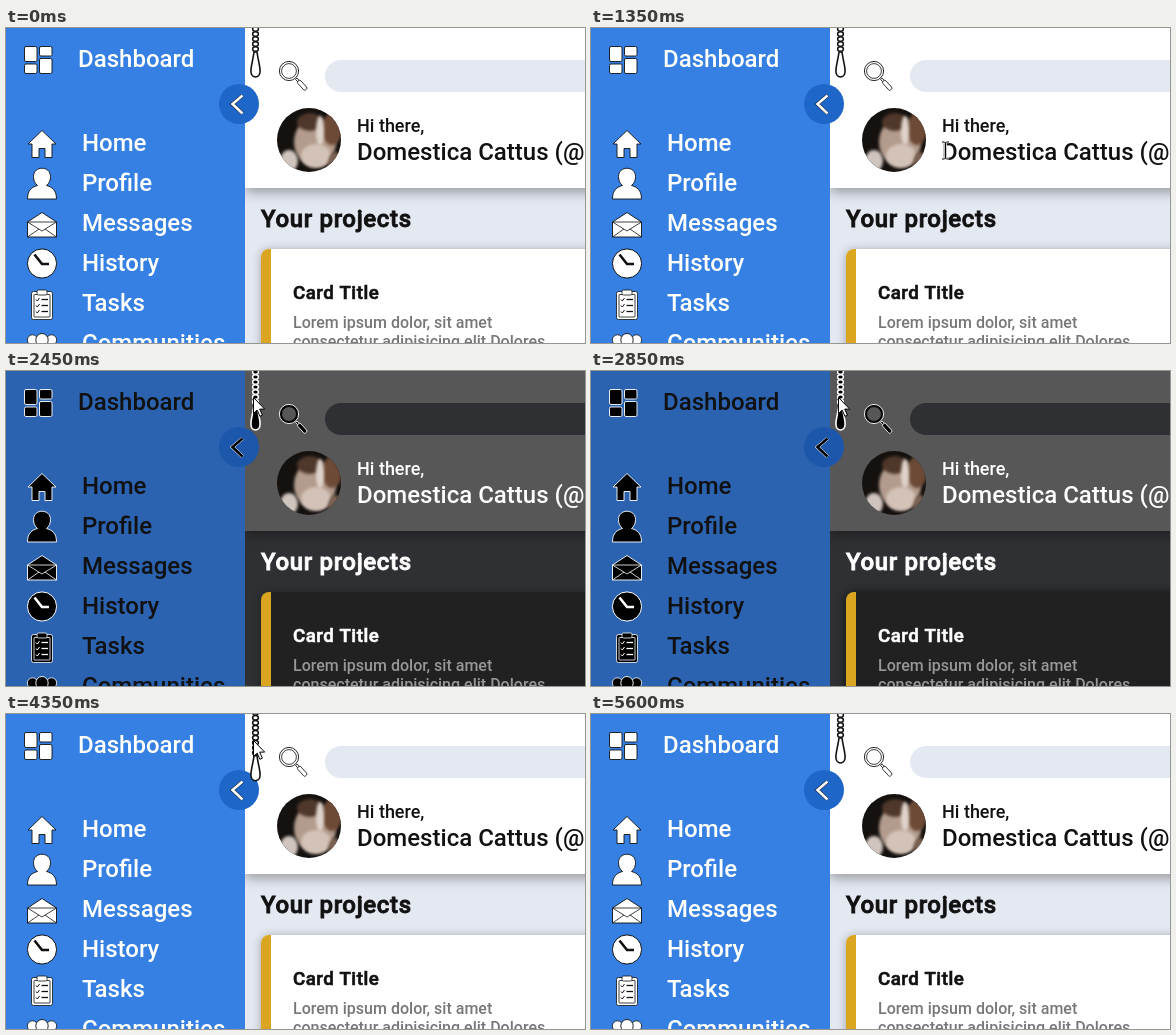
An HTML page with a canvas for the animation above (6200 ms loop, 579 by 315 pixels).

```html
<!DOCTYPE html>
<html lang="en">
<head>
<meta charset="utf-8">
<title>Dashboard theme switch</title>
<style>
  html, body { margin: 0; width: 100%; height: 100%; overflow: hidden; background: #e4e8f1; }
  canvas { display: block; width: 579px; height: 315px; }
</style>
</head>
<body>
<canvas id="stage" width="579" height="315"></canvas>
<script>
const ctx = document.getElementById('stage').getContext('2d');
const LOOP = 6200, STEP = 50;
const DARK_AT = 2450, LIGHT_AT = 3950;
const FONT = 'Roboto, sans-serif';

const LIGHT = {
  side: '#3580e2', sideText: '#fff', knob: '#1e66c8', fill: '#fff', line: '#111',
  head: '#fff', page: '#e4e8f1', text: '#111', card: '#fff', soft: '#777'
};
const DARK = {
  side: '#2b63b0', sideText: '#111', knob: '#1c57ac', fill: '#000', line: '#fff',
  head: '#575757', page: '#2f3033', text: '#fff', card: '#212121', soft: '#979797'
};

// Pointer path: time, x, y
const ENTER = [
  [900, 573, 195], [1100, 468, 158], [1350, 354, 122], [1500, 303, 91],
  [1600, 281, 66], [1750, 262, 43], [1900, 250, 30], [2000, 247, 26]
];
const LEAVE = [
  [4650, 247, 26], [4800, 263, 40], [4950, 295, 64], [5100, 338, 82],
  [5300, 412, 100], [5550, 540, 105]
];

const clamp = v => Math.max(0, Math.min(1, v));
const ease = v => { v = clamp(v); return v * v * (3 - 2 * v); };
const ramp = (t, from, to) => ease((t - from) / (to - from));

function along(path, t) {
  let i = 1;
  while (i < path.length - 1 && path[i][0] < t) i++;
  const [a, b] = [path[i - 1], path[i]];
  const k = clamp((t - a[0]) / (b[0] - a[0]));
  return [Math.round(a[1] + (b[1] - a[1]) * k), Math.round(a[2] + (b[2] - a[2]) * k)];
}

function paint(path, fill, stroke, width = 1) {
  if (fill) { ctx.fillStyle = fill; ctx.fill(path); }
  if (stroke) { ctx.strokeStyle = stroke; ctx.lineWidth = width; ctx.stroke(path); }
}

function shape(d, fill, stroke, width) { paint(new Path2D(d), fill, stroke, width); }

function disc(x, y, rx, ry, fill, stroke, width) {
  const p = new Path2D();
  p.ellipse(x, y, rx, ry, 0, 0, 7);
  paint(p, fill, stroke, width);
}

function box(x, y, w, h, r, fill, stroke, width) {
  const p = new Path2D();
  p.roundRect(x, y, w, h, r);
  paint(p, fill, stroke, width);
}

function withShadow(alpha, blur, dy, draw) {
  ctx.save();
  ctx.shadowColor = `rgba(0,0,0,${alpha})`;
  ctx.shadowBlur = blur;
  ctx.shadowOffsetY = dy;
  draw();
  ctx.restore();
}

function text(str, x, y, size, color) {
  ctx.font = `500 ${size}px ${FONT}`;
  ctx.fillStyle = color;
  ctx.fillText(str, x, y);
}

// Medium weight thickened by its outline
function heavyText(str, x, y, size, color) {
  ctx.save();
  ctx.letterSpacing = size * 0.027 + 'px';
  text(str, x, y, size, color);
  ctx.strokeStyle = color;
  ctx.lineWidth = size * 0.034;
  ctx.strokeText(str, x, y);
  ctx.restore();
}

function drawPage(c, shade) {
  ctx.fillStyle = c.page;
  ctx.fillRect(0, 0, 579, 315);
  withShadow(0.35, 12, 4, () => box(239, -20, 380, 180, 0, c.head));
  withShadow(shade, 10, 1, () => box(255, 221, 380, 160, 8, c.card));
  box(255, 221, 10, 160, [8, 0, 0, 0], '#daa520');

  box(319, 32, 300, 32, 16, c.page);
  drawSearch(c);
  drawAvatar();

  text('Hi there,', 351, 104, 18, c.text);
  text('Domestica Cattus (@', 351, 132, 24, c.text);
  heavyText('Your projects', 255, 199, 24, c.text);
  heavyText('Card Title', 287, 271, 18.72, c.text);
  text('Lorem ipsum dolor, sit amet', 287, 300, 16, c.soft);
  text('consectetur adipisicing elit Dolores', 287, 319, 16, c.soft);
}

function drawSearch(c) {
  ctx.save();
  ctx.translate(291, 51.5);
  ctx.rotate(Math.PI / 4 + 0.05);
  box(-1, -1, 4, 2, 0, c.fill, c.line, 0.8);
  box(2, -2, 11.5, 4, 1.5, c.fill, c.line, 0.8);
  ctx.restore();
  disc(283, 43, 9.6, 9.6, c.fill, c.line, 0.9);
  disc(283, 43, 7.4, 7.4, c.head, c === LIGHT ? c.line : c.fill, 0.8);
}

function drawAvatar() {
  ctx.save();
  const round = new Path2D();
  round.arc(303, 112, 32, 0, 7);
  ctx.clip(round);
  box(271, 80, 64, 64, 0, '#15110f');
  ctx.filter = 'blur(1.5px)';
  disc(309, 114, 21, 24, '#b39c8d');
  disc(304, 94, 13, 9, '#4f382b');
  disc(326, 101, 10, 16, '#6d4a36');
  disc(314, 103, 4, 15, '#ded3cb');
  disc(310, 128, 15, 12, '#d3c2b7');
  disc(283, 133, 9, 11, '#d0c5be');
  disc(329, 136, 7, 12, '#7b6252');
  ctx.restore();
}

function drawSidebar(c) {
  ctx.fillStyle = c.side;
  ctx.fillRect(0, 0, 239, 315);
  disc(233, 76, 20, 20, c.knob);
  const chevron = 'M236.5 67.5L226.5 76L236.5 85.5';
  shape(chevron, null, c.line, 3.6);
  shape(chevron, null, c.fill, 2.6);

  text('Dashboard', 72, 39, 24, c.sideText);
  ['Home', 'Profile', 'Messages', 'History', 'Tasks', 'Communities']
    .forEach((name, i) => text(name, 76, 123 + i * 40, 24, c.sideText));
  drawIcons(c);
}

function drawIcons(c) {
  const { fill, line } = c;
  const icon = (d, w = 0.9) => shape(d, fill, line, w);

  box(18.5, 18.5, 12.5, 15, 1.5, fill, line, 0.9);
  box(33.5, 18.5, 12.5, 9.5, 1.5, fill, line, 0.9);
  box(18.5, 36, 12.5, 9.5, 1.5, fill, line, 0.9);
  box(33.5, 30.5, 12.5, 15, 1.5, fill, line, 0.9);

  icon('M36 102.5L50 116H46V129.5H39V120.5H33V129.5H26V116H22Z');

  icon('M21.5 171C21.5 162 26 159 31.5 157.5C28.5 155 27.5 152 27.5 148.5' +
       'C27.5 137.5 44.5 137.5 44.5 148.5C44.5 152 43.5 155 40.5 157.5' +
       'C46 159 50.5 162 50.5 171Z');

  icon('M21.5 194L36 184.5L50.5 194V209H21.5Z');
  shape('M21.5 194L36 203L50.5 194M21.5 209L33 201M50.5 209L39 201M21.5 194H50.5', null, line, 0.8);

  disc(36, 235.5, 14.6, 14.6, fill, line, 1);
  shape('M28.5 226.5L36 236H43', null, line, 2.6);

  box(25.5, 263.5, 21, 28, 2, fill, line, 0.8);
  box(28, 266.5, 16, 22.5, 0.5, fill, line, 0.8);
  box(31, 262, 10, 5, 1.5, fill, line, 0.8);
  for (let y = 271.5; y < 288; y += 6) {
    shape(`M30 ${y}l1.3 1.5l2.2 -3`, null, line, 1);
    shape(`M35.5 ${y}h6.5`, null, line, 1.3);
  }

  for (const x of [26.5, 45.5]) {
    disc(x, 312, 5.2, 5.2, fill, line, 0.8);
  }
  disc(36, 312, 6.2, 6.5, fill, line, 0.9);
}

function drawCord(c, drop) {
  ctx.save();
  ctx.translate(0, drop);
  for (let y = 21; y > -60; y -= 5) disc(249.5, y, 2.9, 2.3, c.fill, c.line, 1.5);
  shape('M248 24C247 32 244.9 38 244.9 43C244.9 51 254.1 51 254.1 43' +
        'C254.1 38 252 32 251 24Z', c.fill, c.line, 1.6);
  ctx.restore();
}

function drawPointer(x, y) {
  const onText = x >= 351 && ((y >= 89 && y <= 108 && x <= 419) || (y >= 111 && y <= 138));
  ctx.save();
  ctx.translate(x + 0.5, y + 0.5);
  if (onText) {
    const beam = 'M-3.5 -8.5H-1L0 -7.5L1 -8.5H3.5M0 -7.5V7.5M-3.5 8.5H-1L0 7.5L1 8.5H3.5';
    shape(beam, null, '#fff', 2.4);
    shape(beam, null, '#000', 1);
  } else {
    shape('M0 0V16L3.7 12.6L6.4 18.8L8.9 17.7L6.2 11.6H11.2Z', '#fff', '#000', 1);
  }
  ctx.restore();
}

// Quick tug on the cord, held briefly, then released
const tug = (t, start, hold) => 30 * (ramp(t, start, start + 150) - ramp(t, start + hold, start + hold + 150));

function render(t) {
  const theme = t >= DARK_AT && t < LIGHT_AT ? DARK : LIGHT;
  const gloom = ramp(t, DARK_AT, DARK_AT + 150) - ramp(t, LIGHT_AT, LIGHT_AT + 200);
  const hover = 10 * (ramp(t, 1800, 2050) - ramp(t, 4860, 5260));
  const drop = hover + tug(t, DARK_AT, 250) + tug(t, LIGHT_AT, 300);

  drawPage(theme, 0.3 + 0.4 * gloom);
  drawSidebar(theme);
  drawCord(theme, drop);
  if (t >= 900 && t < 5600) drawPointer(...along(t < 4650 ? ENTER : LEAVE, t));
}

const begin = performance.now();
function tick() {
  const t = (performance.now() - begin) % LOOP;
  render(Math.floor(t / STEP) * STEP);
  requestAnimationFrame(tick);
}
tick();
</script>
</body>
</html>
```
